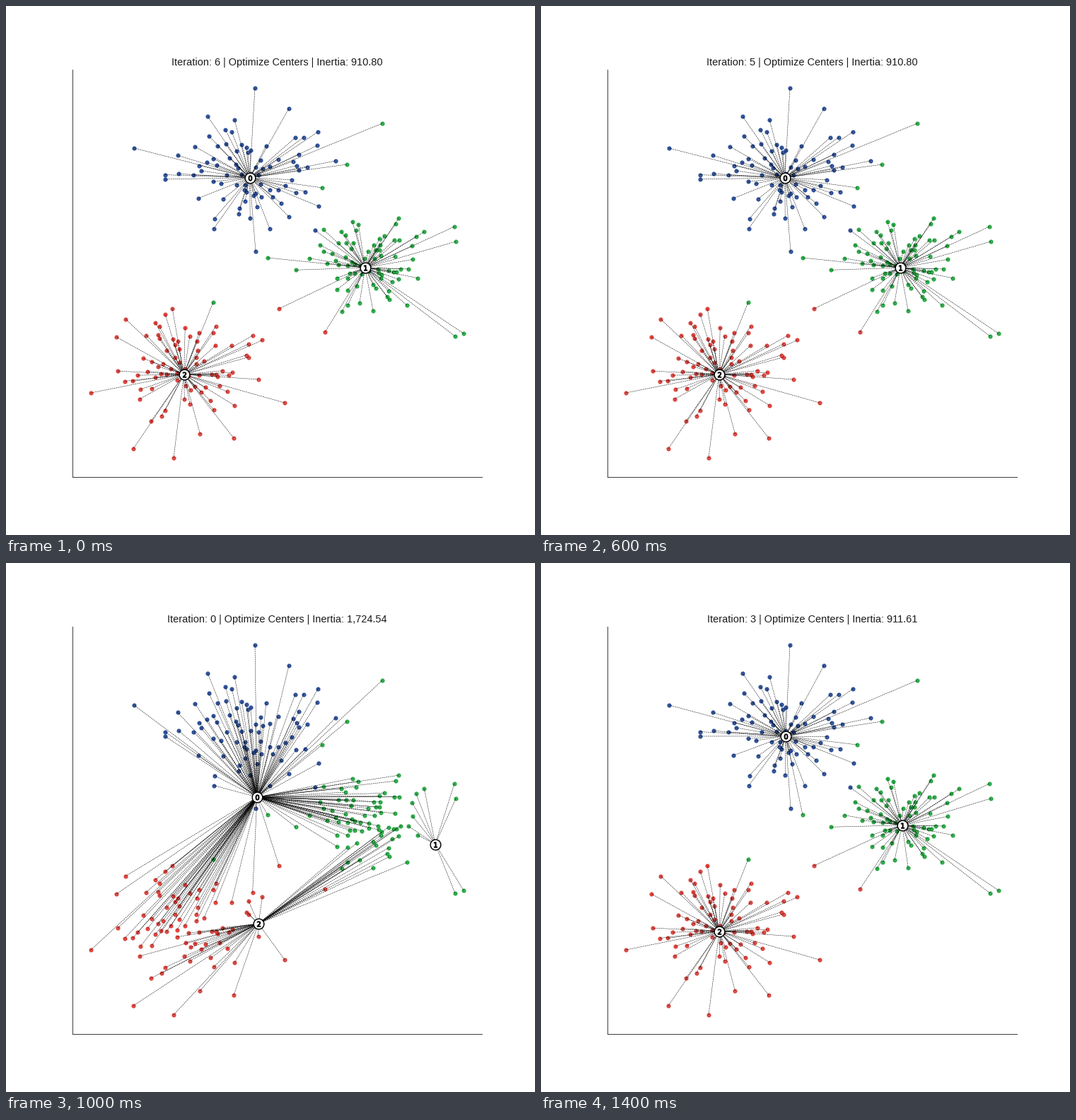
A matplotlib script for the animation above (1.6 s loop, 748 by 748 pixels).

```python
import matplotlib.pyplot as plt
import numpy as np
from matplotlib.animation import FuncAnimation
from matplotlib.collections import LineCollection

rng = np.random.default_rng(11)

# Cluster centers in stage pixels: before, in the first steps, and settled
START = np.array([(454.3, 397.4), (660, 424.9), (476.1, 424.9)])
EARLY = np.array([
    [(355, 331), (607, 397.5), (357, 510)],
    [(368, 271), (544.5, 377), (258.5, 519.5)],
    [(348, 248), (515, 372), (253, 520)],
])
SETTLED = np.array([(344.5, 242.5), (507.5, 370), (251.5, 521)])
INERTIA = [1724.54, 1026.17, 920.85, 911.61, 910.99, 910.80, 910.80]
ORDER = [6, 6, 4, 5, 1, 0, 2, 3]
X_SCALE = 0.81  # horizontal data units per pixel, relative to vertical


def blob(n, center, spread, strays):
    """Bell-shaped cloud with evenly fanned angles, plus a few far strays."""
    i = np.arange(n)
    u = 0.94 * (i + rng.uniform(0, 1, n)) / n
    r = spread * np.sqrt(-2 * np.log(1 - u))
    angle = 2.39996 * i + rng.normal(0, 0.4, n)
    cloud = np.column_stack([r * np.cos(angle) / X_SCALE, r * np.sin(angle)])
    return np.vstack([center + cloud, strays])


def centers_at(step):
    if step < 0:
        return START
    if step < len(EARLY):
        return EARLY[step]
    return SETTLED + (EARLY[-1] - SETTLED) * 0.42 ** (step - len(EARLY) + 1)


def assign(points, centers):
    gap = (points[:, None] - centers) * (X_SCALE, 1)
    return np.argmin((gap ** 2).sum(axis=2), axis=1)


blobs = {
    "#12398a": blob(74, (343, 236), 43,
                    [(352, 116), (181, 201), (225, 245), (437, 317), (466, 219),
                     (400, 145), (353, 347)]),
    "#0f9e2f": blob(74, (508, 365), 35,
                    [(532, 166), (482, 224), (447, 257), (634, 312), (636, 333),
                     (647, 463), (635, 467), (370, 356), (293, 419)]),
    "#d82b25": blob(77, (251, 513), 43,
                    [(120, 547), (180, 626), (237, 639), (322, 611), (394, 561),
                     (386, 428), (451, 461)]),
}
points = np.vstack(list(blobs.values()))

fig, ax = plt.subplots(figsize=(10, 10), dpi=74.8, facecolor="white")
ax.set(xlim=(93.5, 673.2), ylim=(665.72, 89.76), xticks=[], yticks=[])
ax.spines[["top", "right"]].set_visible(False)
ax.spines[["left", "bottom"]].set(color="0.15", linewidth=0.85)
title = ax.set_title("", fontfamily="Liberation Sans", fontsize=14, color="0.1")

for color, cloud in blobs.items():
    ax.scatter(*cloud.T, s=20, color=color, alpha=0.8, linewidths=1.5, zorder=1)
links = LineCollection([], colors="black", linestyles="--", linewidths=0.5, zorder=2)
ax.add_collection(links, autolim=False)
discs = ax.scatter(*START.T, s=200, c="white", edgecolors="black",
                   linewidths=1.4, zorder=3)
digits = [ax.scatter(*c, s=50, marker=f"${i}$", c="black", edgecolors="black",
                     linewidths=1, zorder=4) for i, c in enumerate(START)]


def update(frame):
    step = ORDER[frame]
    centers = centers_at(step)
    labels = assign(points, centers_at(step - 1))
    links.set_segments(np.stack([points, centers[labels]], axis=1))
    discs.set_offsets(centers)
    for digit, c in zip(digits, centers):
        digit.set_offsets([c])
    title.set_text(f"Iteration: {step} | Optimize Centers | Inertia: {INERTIA[step]:,.2f}")
    return [links, discs, title, *digits]


anim = FuncAnimation(fig, update, frames=len(ORDER), interval=200, repeat=True,
                     repeat_delay=0, blit=False)
plt.show()
```
